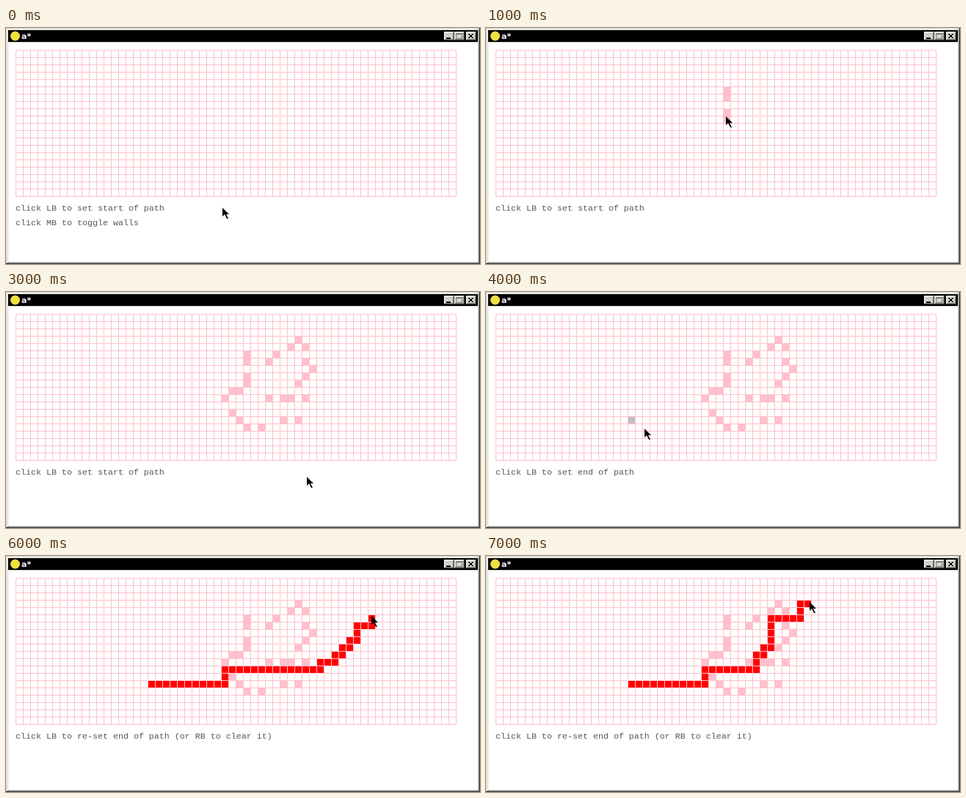
Write an HTML page with a canvas that moves like this. It is 646x323 px and loops after 8000 ms.

```html
<!DOCTYPE html>
<html lang="en">
<head>
<meta charset="utf-8">
<title>a*</title>
<style>
  html, body { margin: 0; width: 100%; height: 100%; overflow: hidden; background: #d4d0c8; }
  canvas { display: block; }
</style>
</head>
<body>
<canvas id="stage" width="646" height="323"></canvas>
<script>
const ctx = document.getElementById('stage').getContext('2d');
const LEFT = 13, TOP = 30, CELL = 10, COLS = 60, ROWS = 20, SECONDS = 8;
const PINK = '#ffc0cb', FACE = '#d4d0c8';

// Mouse drags that leave walls, with the second at which they show up.
const drags = [
  { at: 1, keys: [[31, 5], [31, 9]] },
  { at: 2, keys: [[31, 9], [28, 11]] },
  { at: 2, keys: [[29, 13], [31, 15], [38, 14]] },
  { at: 2, keys: [[34, 11], [39, 11]] },
  { at: 3, keys: [[34, 6], [38, 3], [40, 7], [38, 9]] }
];

// Corners of the found paths; slanted legs become stairs.
const start = [18, 14];
const trunk = [start, [28, 14], [28, 12]];
const paths = {
  6: [...trunk, [41, 12], [43, 11], [46, 8], [46, 6], [48, 6], [48, 5]],
  7: [...trunk, [35, 12], [35, 11], [37, 9], [37, 5], [41, 5], [41, 3], [42, 3]]
};

const cursors = [[295, 246], [327, 121], [356, 114], [410, 253],
  [216, 187], [498, 82], [498, 82], [441, 63]];

// A drag is sampled three times per leg, so fast moves leave gaps.
function sampleDrag(keys) {
  const cells = [keys[0]];
  for (let i = 1; i < keys.length; i++) {
    for (let k = 1; k <= 3; k++) {
      cells.push(keys[i].map((end, axis) => {
        const from = keys[i - 1][axis];
        return Math.round(from + (end - from) * k / 3);
      }));
    }
  }
  return cells;
}

// Walks up and right in turn until each corner is reached.
function walk(corners) {
  let [col, row] = corners[0];
  const cells = [[col, row]];
  for (const [endCol, endRow] of corners) {
    while (col < endCol || row > endRow) {
      if (row > endRow) cells.push([col, --row]);
      if (col < endCol) cells.push([++col, row]);
    }
  }
  return cells;
}

function rect(color, x, y, w, h) {
  ctx.fillStyle = color;
  ctx.fillRect(x, y, w, h);
}

function label(text, x, y, font, color) {
  ctx.font = font;
  ctx.fillStyle = color;
  ctx.fillText(text, x, y);
}

function bevel(x, y, w, h) {
  rect('#404040', x, y, w, h);
  rect('#fff', x, y, w - 1, h - 1);
  rect('#808080', x + 1, y + 1, w - 2, h - 2);
  rect(FACE, x + 1, y + 1, w - 3, h - 3);
}

function drawWindow() {
  rect('#404040', 0, 0, 646, 323);
  rect(FACE, 0, 0, 645, 322);
  rect('#808080', 1, 1, 644, 321);
  rect('#fff', 1, 1, 643, 320);
  rect(FACE, 2, 2, 642, 319);
  rect('#fff', 3, 20, 640, 300);
  rect('#000', 3, 3, 640, 16);

  ctx.fillStyle = '#f0e040';
  ctx.beginPath();
  ctx.arc(12.5, 11, 6.5, 0, 7);
  ctx.fill();
  label('a*', 21, 15, 'bold 11px "DejaVu Sans", sans-serif', '#fff');

  for (const x of [597, 611, 627]) bevel(x, 5, 14, 12);
  rect('#000', 600, 13, 6, 2);
  rect('#808080', 613, 7, 9, 8);
  rect(FACE, 614, 9, 7, 5);
  for (let i = 0; i < 6; i++) {
    rect('#000', 630 + i, 8 + i, 2, 1);
    rect('#000', 635 - i, 8 + i, 2, 1);
  }
}

function drawGrid() {
  for (let c = 0; c <= COLS; c++) rect(PINK, LEFT + c * CELL, TOP, 1, ROWS * CELL + 1);
  for (let r = 0; r <= ROWS; r++) rect(PINK, LEFT, TOP + r * CELL, COLS * CELL + 1, 1);
}

function fillCells(color, cells) {
  for (const [col, row] of cells) {
    rect(color, LEFT + 1 + col * CELL, TOP + 1 + row * CELL, CELL - 1, CELL - 1);
  }
}

function drawHelp(second) {
  const lines = [
    second < 4 ? 'click LB to set start of path'
      : second < 6 ? 'click LB to set end of path'
      : 'click LB to re-set end of path (or RB to clear it)'
  ];
  if (second === 0) lines.push('click MB to toggle walls');
  lines.forEach((line, i) =>
    label(line, LEFT, 250 + i * 20, '11.667px "Liberation Mono", monospace', '#585858'));
}

function drawCursor(x, y) {
  ctx.fillStyle = '#000';
  ctx.fill(new Path2D(`M${x} ${y}v12l3-3 3 6h2l-3-6h4z`));
}

function draw(second) {
  drawWindow();
  drawGrid();
  for (const { at, keys } of drags) {
    if (second >= at) fillCells(PINK, sampleDrag(keys));
  }
  if (second >= 4) fillCells('#c0c0c0', [start]);
  if (paths[second]) fillCells('#f00', walk(paths[second]));
  drawHelp(second);
  drawCursor(...cursors[second]);
}

function tick() {
  draw(Math.floor(performance.now() / 1000) % SECONDS);
  requestAnimationFrame(tick);
}
tick();
</script>
</body>
</html>
```
